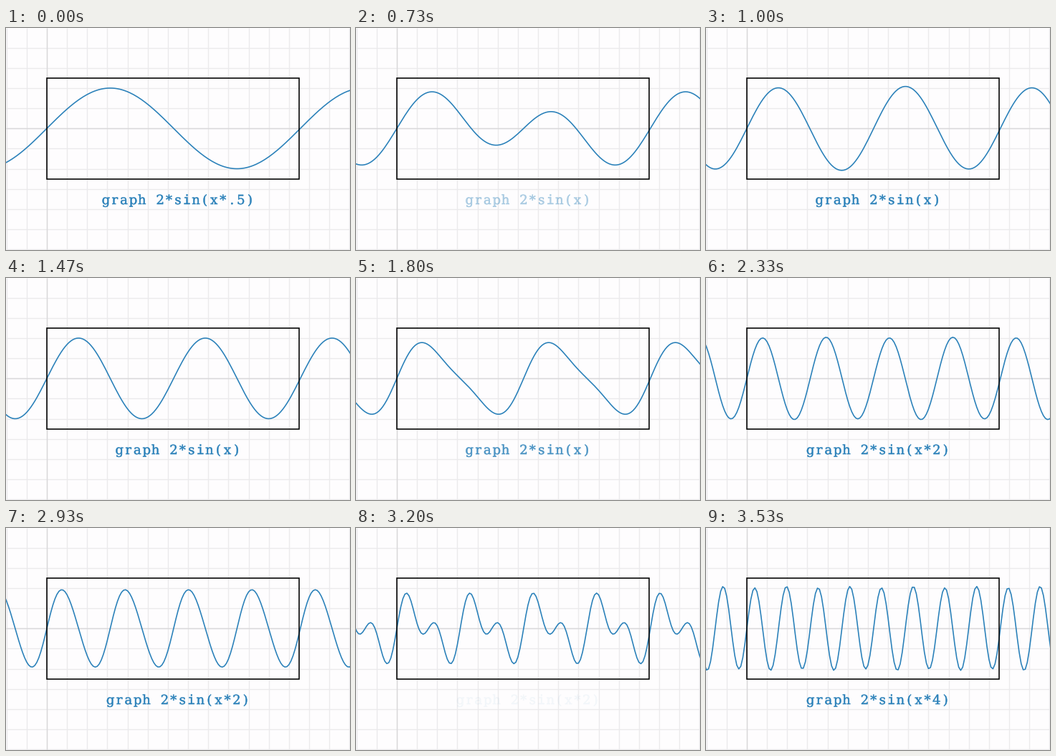
Animation of 480x310 px, one loop 3.59 s. Source, as a matplotlib script:

```python
import matplotlib.pyplot as plt
import numpy as np
from matplotlib.animation import FuncAnimation
from matplotlib.collections import LineCollection
from matplotlib.patches import PathPatch, Rectangle
from matplotlib.path import Path
from matplotlib.textpath import TextPath
from matplotlib.transforms import Affine2D

W, H, DPI = 480, 310, 100
LOOP, TICK = 3590, 10          # ms
FPS = 15
UNIT = 28.15                   # pixels per graph unit
X0, Y0 = 57, 140.2             # origin
CELL, BASELINE = 12.55, 246    # text pitch and baseline
BLUE = "#2980b9"

FREQS = [0.5, 1, 2, 4]
LABELS = [f"graph 2*sin({arg})" for arg in ("x*.5", "x", "x*2", "x*4")]
STARTS = [2, 21, 40]           # steps at which each morph begins


def pt(px):
    return px * 72 / DPI


def label_path(text):
    """Monospaced slab lettering, centred on the stage."""
    left = W / 2 - CELL * len(text) / 2
    glyphs = []
    for i, ch in enumerate(text):
        if ch == " ":
            continue
        family = "DejaVu Sans Mono" if ch == "i" else "DejaVu Serif"
        glyph = TextPath((0, 0), ch, size=18, prop={"family": family})
        box = glyph.get_extents()
        place = Affine2D().translate(-(box.x0 + box.x1) / 2, 0).scale(1, -1)
        place.translate(left + (i + 0.5) * CELL, BASELINE)
        glyphs.append(place.transform_path(glyph))
    return Path.make_compound_path(*glyphs)


def morph(t):
    """S-curve with a small overshoot before it settles."""
    if t < 1.5:
        return 0.0
    rise = 1 / (1 + np.exp(-0.735 * (t - 8.157)))
    return rise + 0.055 * np.exp(-((t - 12.6) / 1.6) ** 2)


def fade(t):
    """Old label fades out, new one fades in."""
    return min(1, abs(t - 8.1) / 2.6)


fig = plt.figure(figsize=(W / DPI, H / DPI), dpi=DPI, facecolor="#fefdfe")
ax = fig.add_axes([0, 0, 1, 1])
ax.set(xlim=(0, W), ylim=(H, 0))
ax.axis("off")

grid = [[(x, 0), (x, H)] for x in X0 + UNIT * np.arange(-2, 16)]
grid += [[(0, y), (W, y)] for y in Y0 + UNIT * np.arange(-4, 7)]
ax.add_collection(LineCollection(grid, colors="#ebeaec", linewidths=pt(1.4)))
axes_lines = [[(X0, 0), (X0, H)], [(0, Y0), (W, Y0)]]
ax.add_collection(LineCollection(axes_lines, colors="#d9d8da", linewidths=pt(1.4)))

u = np.arange(-2.1, 15.3, 0.1)
curve, = ax.plot(X0 + UNIT * u, 0 * u, color=BLUE, lw=pt(1.6), zorder=3)
ax.add_patch(Rectangle((57, 69.7), 352, 141, fill=False, ec="black",
                       lw=pt(1.6), joinstyle="miter", zorder=4))

paths = [label_path(text) for text in LABELS]
label = ax.add_patch(PathPatch(paths[0], fc=BLUE, ec=BLUE, lw=pt(0.5), zorder=3))


def update(i):
    step = int(i * TICK * FPS / 1000 + 0.06)
    k = max(0, sum(step >= s for s in STARTS) - 1)
    t = step - STARTS[k]
    w = morph(t)
    wave = (1 - w) * np.sin(FREQS[k] * u) + w * np.sin(FREQS[k + 1] * u)
    curve.set_ydata(Y0 - 2 * UNIT * wave)
    label.set_path(paths[k + (t > 8.1)])
    label.set_alpha(fade(t))
    return curve, label


anim = FuncAnimation(fig, update, frames=LOOP // TICK, interval=TICK,
                     repeat=True, repeat_delay=0)
plt.show()
```
